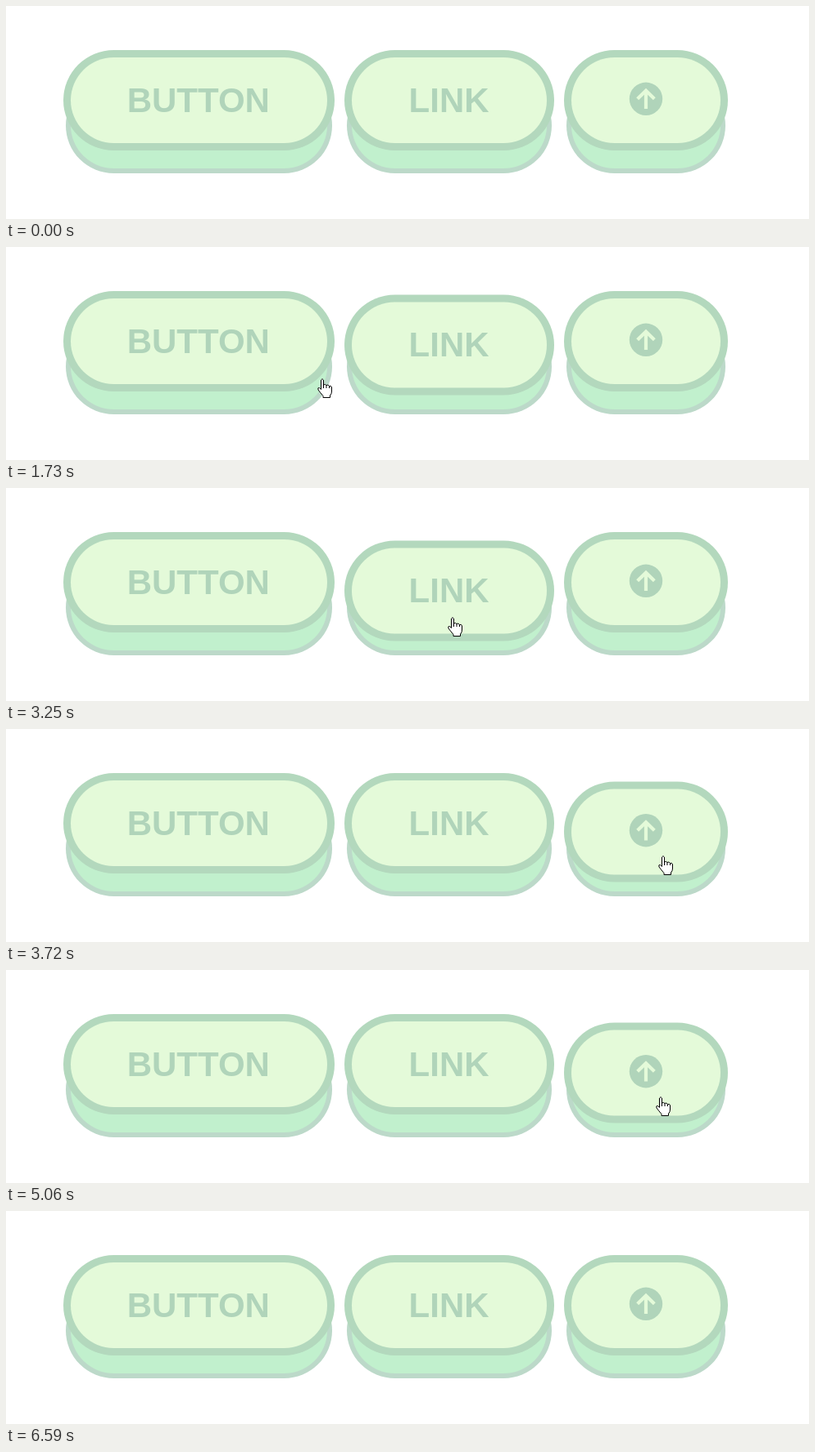
An HTML page with a canvas that plays this animation: 980x261 px, repeating every 7.46 s.

```html
<!DOCTYPE html>
<html lang="en">
<head>
<meta charset="utf-8">
<title>Soft push buttons</title>
<style>
  html, body { margin: 0; width: 100%; height: 100%; overflow: hidden; background: #fff; }
  canvas { display: block; }
</style>
</head>
<body>
<canvas id="stage" width="980" height="261"></canvas>
<script>
const ctx = document.getElementById('stage').getContext('2d');
const LOOP = 7460, STEP = 1000 / 15, PHASE = 14;
const EASE_MS = 230, HOVER = 10.4, PRESS = 31, REST = 0;
const TOP = 54, HEIGHT = 123, BORDER = 9;
const FACE = '#e4fad9', RIM = '#b3d8bd', INK = '#b0d4ba';
const SIDE = '#c1f0cd', SIDE_RIM = '#bcd9c9';

// moves: [start time, target offset]
const buttons = [
  { x: 70, w: 331, label: 'BUTTON', cx: 234.8,
    moves: [[1721, HOVER], [2340, PRESS], [2515, HOVER], [2790, REST]] },
  { x: 413, w: 256, label: 'LINK', cx: 540.6,
    moves: [[1330, HOVER], [1682, REST], [2812, HOVER], [3195, PRESS], [3320, HOVER], [3480, REST]] },
  { x: 681, w: 200, cx: 781,
    moves: [[625, HOVER], [1310, REST], [3490, HOVER], [3930, PRESS], [4080, HOVER],
            [4526, PRESS], [4800, HOVER], [5270, PRESS], [5820, HOVER], [6290, REST]] }
];

// pointer path: [time, x, y]
const path = [
  [519, 764, 245], [590, 764, 245], [652, 779, 185], [850, 798, 162], [1100, 800, 162],
  [1719, 386, 161], [1986, 327, 160], [2690, 327, 160], [2990, 545, 158], [3380, 545, 158],
  [3600, 802, 155], [4100, 802, 155], [4180, 798.5, 155], [6160, 798.5, 155], [6400, 850, 262]
];

const hand = new Path2D('M4.5 2Q6 -.8 7.5 2V8Q9.5 6.5 11 8.5Q13 7 14.5 9.5Q17 8.5 17.5 11V16' +
  'Q17.5 19 15.5 21V23.5H7V21.5Q4 18 1 14Q0 11 2.5 11.5L4.5 13.5Z');
const knuckles = new Path2D('M7.5 8V12M11 8.5V12M14.5 9.5V12');
const arrow = new Path2D('M.5 .5V16.5L4 13L6.5 18.5L8.8 17.5L6.4 12.2H11.5Z');

function backOut(u) {
  const v = u - 1;
  return 1 + 2.4 * v ** 3 + 1.4 * v ** 2;
}

function pose(moves, t) {
  let start = -EASE_MS, from = REST, to = REST;
  const at = time => from + (to - from) * backOut(Math.min(1, (time - start) / EASE_MS));
  for (const [time, target] of moves) {
    if (time > t) break;
    from = at(time);
    start = time;
    to = target;
  }
  return { y: at(t), pressed: to === PRESS, u: Math.min(1, (t - start) / EASE_MS) };
}

function pill(x, y, w, h, color) {
  ctx.fillStyle = color;
  ctx.beginPath();
  ctx.roundRect(x, y, w, h, h / 2);
  ctx.fill();
}

function rimmed(x, y, w, h, edge, rim, fill) {
  pill(x, y, w, h, rim);
  pill(x + edge, y + edge, w - 2 * edge, h - 2 * edge, fill);
}

function upIcon(x, y) {
  ctx.fillStyle = INK;
  ctx.beginPath();
  ctx.arc(x, y, 20.2, 0, 2 * Math.PI);
  ctx.fill();
  ctx.strokeStyle = FACE;
  ctx.lineWidth = 4.2;
  ctx.beginPath();
  ctx.moveTo(x - 10.3, y);
  ctx.lineTo(x, y - 10);
  ctx.lineTo(x + 10.3, y);
  ctx.moveTo(x, y - 9);
  ctx.lineTo(x, y + 12.3);
  ctx.stroke();
}

function drawButton(b, { y, pressed, u }) {
  const lag = pressed ? 3.5 * Math.sin(Math.PI * u) : 0;
  rimmed(b.x + 3, TOP + 3 + PRESS + lag, b.w - 6, HEIGHT - 6, 6, SIDE_RIM, SIDE);
  rimmed(b.x, TOP + y, b.w, HEIGHT, BORDER, RIM, FACE);
  if (!b.label) return upIcon(b.cx, 113.8 + y);
  ctx.fillStyle = INK;
  ctx.font = 'bold 42px "Liberation Sans", Arial, sans-serif';
  ctx.textAlign = 'center';
  ctx.fillText(b.label, b.cx, 129.5 + y);
}

function pointerAt(t) {
  const i = path.findIndex(p => p[0] > t);
  if (i < 1) return null;
  const [t0, x0, y0] = path[i - 1], [t1, x1, y1] = path[i];
  const k = (t - t0) / (t1 - t0);
  return [Math.round(x0 + (x1 - x0) * k), Math.round(y0 + (y1 - y0) * k)];
}

function drawPointer([x, y], pressed) {
  if (pressed) {
    ctx.fillStyle = 'rgba(255,250,0,.55)';
    ctx.beginPath();
    ctx.arc(x - 1, y, 12, 0, 2 * Math.PI);
    ctx.fill();
  }
  const over = y < 205 && buttons.some(b => x >= b.x && x <= b.x + b.w);
  ctx.save();
  ctx.translate(over ? x - 6 : x, y);
  ctx.fillStyle = '#fff';
  ctx.strokeStyle = '#000';
  ctx.lineWidth = 1;
  ctx.fill(over ? hand : arrow);
  ctx.stroke(over ? hand : arrow);
  if (over) ctx.stroke(knuckles);
  ctx.restore();
}

function draw(time) {
  // the motion advances in fifteenths of a second
  const t = Math.floor((time % LOOP + PHASE) / STEP) * STEP - PHASE;
  ctx.fillStyle = '#fff';
  ctx.fillRect(0, 0, 980, 261);
  const poses = buttons.map(b => pose(b.moves, t));
  buttons.forEach((b, i) => drawButton(b, poses[i]));
  const at = pointerAt(t);
  if (at) drawPointer(at, poses.some(p => p.pressed));
}

const begin = performance.now();
function tick() {
  draw(performance.now() - begin);
  requestAnimationFrame(tick);
}
tick();
</script>
</body>
</html>
```
